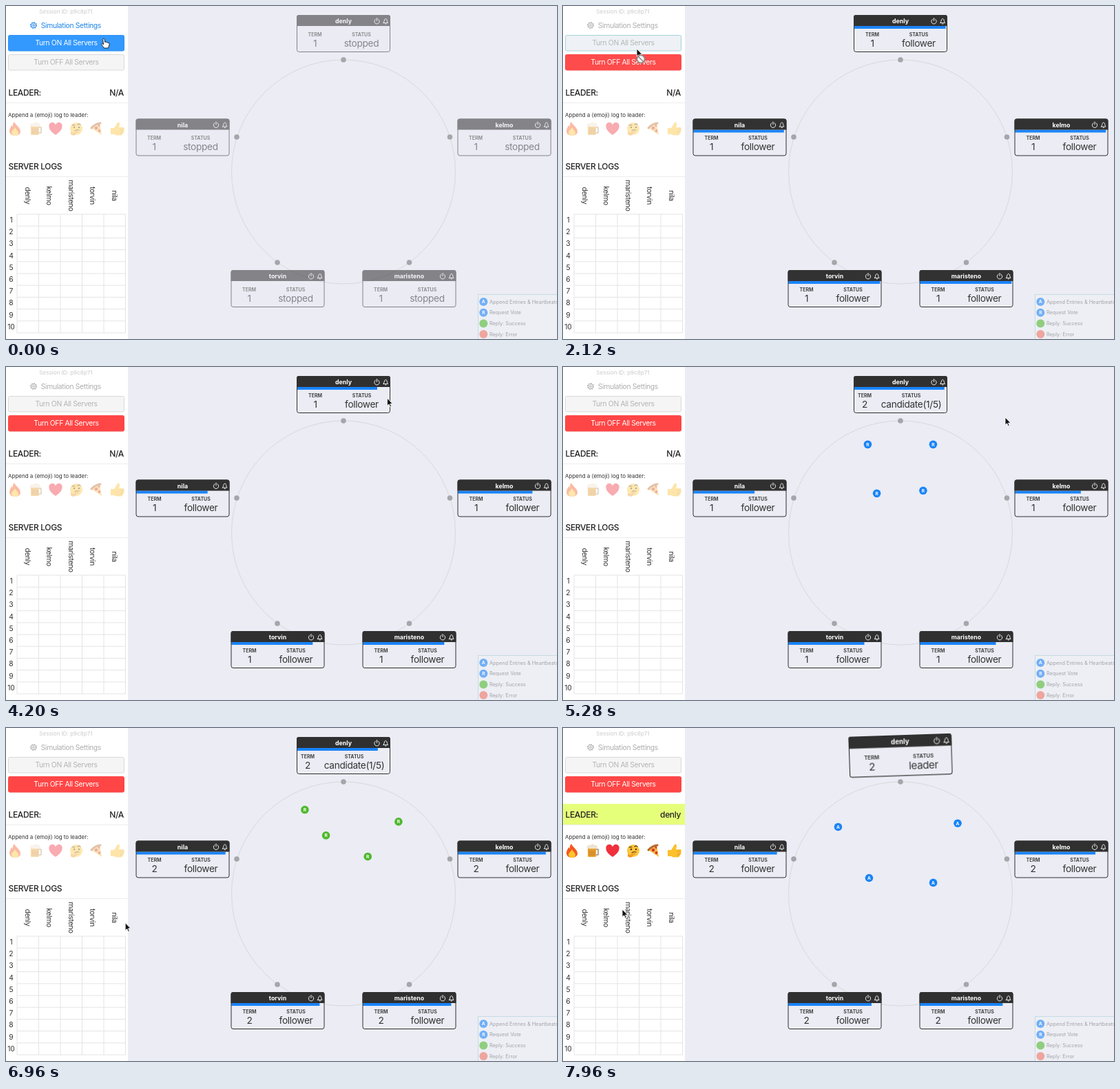
Write an HTML page that moves like this. It is 800 px wide and 483 px high and loops after 8 s.

```html
<!DOCTYPE html>
<html lang="en">
<head>
<meta charset="utf-8">
<title>Leader election</title>
<style>
  html, body { margin: 0; width: 100%; height: 100%; overflow: hidden; background: #ebecf4; }
  svg { display: block; width: 800px; height: 483px; font-family: Inter, Roboto, sans-serif; font-size: 10.3px; fill: #333; }
  text { white-space: pre; }
  .mid { text-anchor: middle; }
  .end { text-anchor: end; }
  .ui { letter-spacing: -.03em; }
  .title { font-size: 12px; font-weight: 500; letter-spacing: -.03em; fill: #222; }
  .small { font-size: 8px; }
  .label { font-size: 7px; font-weight: 700; fill: #444; }
  .value { font-size: 13.7px; letter-spacing: -.025em; }
  .name { font-size: 8.8px; font-weight: 700; fill: #fff; }
  .letter { font-size: 6.6px; font-weight: 700; fill: #fff; text-anchor: middle; }
  .legend { font-size: 7.3px; fill: #6f7076; }
  .line { fill: none; stroke-linecap: round; stroke-linejoin: round; }
  .body { transform-origin: 68px 27px; }
</style>
</head>
<body>
<svg id="stage" viewBox="0 0 800 483">
  <rect width="800" height="483" fill="#ebecf4"/>
  <circle cx="490" cy="240.5" r="162.5" fill="none" stroke="#d9d9dc"/>
  <g id="messages"></g>
  <g id="dots" fill="#a6a6aa"></g>
  <g id="cards"></g>

  <g id="legend" opacity=".58">
    <rect x="685.5" y="418.5" width="130" height="80" fill="#eef1f6" stroke="#a9cfd4"/>
  </g>

  <rect width="177" height="483" fill="#fff"/>
  <text class="small mid" x="87" y="11" font-weight="500" fill="#d2d2d2">Session ID: p9c8p71</text>
  <g id="settings" stroke="#1c84e6" fill="#1c84e6">
    <g fill="none">
      <circle cx="40" cy="28" r="3.5"/>
      <circle cx="40" cy="28" r="1.4" stroke-width=".9"/>
      <circle cx="40" cy="28" r="4.4" stroke-width="1.2" stroke-dasharray="1.7 1.75"/>
    </g>
    <text class="ui" x="50.7" y="31.7" stroke="none">Simulation Settings</text>
  </g>
  <g id="buttons"></g>

  <rect id="leaderBar" y="110" width="177" height="30" fill="#e6ff7b"/>
  <path d="M0 140.5H177M0 247.5H177" stroke="#ededed"/>
  <text class="title" x="3.5" y="130">LEADER:</text>
  <text class="title end" id="leader" x="171" y="130"></text>
  <text class="small" x="3" y="160.5">Append a (emoji) log to leader:</text>

  <g id="emoji">
    <g transform="translate(13 178)">
      <path fill="#f4581f" d="M-1-10C1-5 8-2 8 4C8 8 4 10 0 10S-8 8-8 3C-8 0-6-2-5-5C-4-4-3-3-3-1C-4-4-3-8-1-10Z"/>
      <path fill="#fdc52c" d="M0-2C1 1 5 3 5 6S3 10 0 10-5 8-5 5.500C-5 3-1 1 0-2Z"/>
    </g>
    <g transform="translate(43 178)">
      <path class="line" stroke="#b9a58b" stroke-width="2" d="M4-2H8V6H4"/>
      <rect x="-7" y="-5" width="12" height="14" rx="1.500" fill="#e9a12f"/>
      <path class="line" stroke="#b9712a" d="M-4 0V7M-1 0V7M2 0V7"/>
      <path fill="#eee3d0" d="M-8-3C-10-7-5-9-3-8C-1-11 3-9 4-8C8-8 8-3 5-3Z"/>
    </g>
    <path transform="translate(72 178)" fill="#f0303c" d="M0 9C-6 5-9.500 1-9.500-3A4.900 4.900 0 0 1 0-5.500A4.900 4.900 0 0 1 9.500-3C9.500 1 6 5 0 9Z"/>
    <g transform="translate(102 178)">
      <circle r="9" fill="#fcc63a"/>
      <path class="line" stroke="#6a4216" stroke-width="1.300" d="M-6-5Q-4-6-2-5M2-6Q4-8 6-6M-2 3Q1 1 4 2"/>
      <circle cx="-3" cy="-2" r="1.300" fill="#5b3510"/>
      <circle cx="4" cy="-2" r="1.300" fill="#5b3510"/>
      <path fill="#ef9a25" d="M-8 4L-5 6L3 3V5L-1 7C0 10-6 11-8 8Z"/>
    </g>
    <g transform="translate(132 178)">
      <path fill="#f6bd4a" d="M-8-1L4-8L7 9Z"/>
      <path class="line" stroke="#b8692b" stroke-width="3" d="M-8-1Q-3-7 5-8"/>
      <g fill="#d2352b"><circle cx="-1" cy="-1" r="2.300"/><circle cx="3.500" cy="3" r="1.900"/><circle cx="3" cy="-4.500" r="1.400"/></g>
    </g>
    <g transform="translate(162 178)">
      <path fill="#fcc02d" d="M-10-1H-5L0-9C3-11 4-7 2-2H8C10-2 10 0 9 1C10 2 10 4 8.500 4.500C9 6 8 7 7 7C7 9 6 9.500 4 9.500H-2L-5 8H-10Z"/>
      <path class="line" stroke="#dd8f1c" stroke-width=".8" d="M4 1H9M4 4.500H8.500M4 7H7"/>
    </g>
  </g>

  <text class="title" x="3.500" y="237">SERVER LOGS</text>
  <g id="table"></g>

  <g id="cursor">
    <path id="hand" fill="#fff" stroke="#222" stroke-linejoin="round" d="M-1.300.500C-1.300-1 1-1 1.200.500L1.700 4.500C3 3.800 3.700 4.200 4 5C5 4.400 5.800 4.900 6 5.600C7.500 5 8 6 8 7.200C8 9.500 7 10.500 6.500 13H0C-.500 11-2.500 9.500-3.500 7.500C-3.500 6-2 6.200-.500 8Z"/>
    <path id="arrow" fill="#111" stroke="#fff" stroke-width=".9" d="M0 0V11.200L2.600 8.800L4.400 12.800L6.200 12L4.500 8.200H8Z"/>
    <g id="denied" fill="#f4f4f4" stroke="#8b8b8b" stroke-width="1.500">
      <circle cx="6" cy="15" r="5.500"/><path d="M2.200 11.200L9.800 18.800"/>
    </g>
  </g>
</svg>
<script>
const LOOP = 8000, POWER_ON = 1830, CLOCK = 1880, CANDIDATE = 4833, SECOND_VOTE = 7277, ELECTED = 7340;
const BLUE = '#1a84f8', GREEN = '#4eb82b';
const $ = id => document.getElementById(id);
const add = (id, html) => {
  $(id).insertAdjacentHTML('beforeend', html);
  return $(id).lastElementChild;
};
const ramp = (t, start, length) => Math.min(1, Math.max(0, (t - start) / length));
const text = (x, y, cls, str, more = '') => `<text x="${x}" y="${y}" class="${cls}" ${more}>${str}</text>`;
const range = n => [...Array(n).keys()];

// reset: when the election timer restarts; rates: timer speed in px/s before and after
const servers = [
  { name: 'denly', x: 422, y: 13, dot: [490, 78], reset: CANDIDATE, rates: [8, 8.3] },
  { name: 'kelmo', x: 655.5, y: 163.5, dot: [644.5, 190], reset: 6293, rates: [11.5, 10.8] },
  { name: 'maristeno', x: 517.5, y: 383, dot: [585.5, 372], reset: 6133, rates: [7.2, 8] },
  { name: 'torvin', x: 326.5, y: 383, dot: [394, 372], reset: 6083, rates: [7.2, 7.5] },
  { name: 'nila', x: 188.5, y: 163.5, dot: [335, 190], reset: 6293, rates: [13.5, 8] }
];

// centres of the term and status columns
const columns = { stopped: [26.5, 94], follower: [27, 94.5], candidate: [16, 83.5], leader: [30, 98] };

for (const s of servers) {
  add('dots', `<circle cx="${s.dot[0]}" cy="${s.dot[1]}" r="3.8"/>`);
  s.el = add('cards', `<g transform="translate(${s.x} ${s.y})"><g class="body">
    <rect x=".5" y=".5" width="135" height="53" rx="3" fill="#ebecf4"/>
    <rect class="bar" x=".5" y="16" height="4" fill="${BLUE}"/>
    <path d="M0 16V3Q0 0 3 0H133Q136 0 136 3V16Z" fill="#303030"/>
    <rect x=".5" y=".5" width="135" height="53" rx="3" fill="none" stroke="#303030"/>
    ${text(68, 12, 'name mid', s.name)}
    <g class="line" stroke="#fff" stroke-width=".9">
      <path d="M114.700 6A3.700 3.700 0 1 0 118.300 6M116.500 4.500V8.500"/>
      <path d="M126 11.500H132.500C131 10 131.600 5.500 129.300 5.500S127.500 10 126 11.500ZM128.700 13H129.900"/>
    </g>
    ${text(0, 30.6, 'label mid term', 'TERM')}${text(0, 45.7, 'value mid term', '')}
    ${text(0, 30.6, 'label mid status', 'STATUS')}${text(0, 45.7, 'value mid status', '')}
  </g></g>`).firstElementChild;
  s.bar = s.el.querySelector('.bar');
  s.term = s.el.querySelectorAll('.term');
  s.status = s.el.querySelectorAll('.status');
}

const tada = servers[0].el.animate([0, .1, .2, .3, .4, .5, .6, .7, .8, .9, 1].map((offset, i) => ({
  offset, easing: 'ease',
  transform: i % 10 === 0 ? 'scale(1) rotate(0deg)'
    : i < 3 ? 'scale(.9) rotate(-3deg)' : `scale(1.1) rotate(${i % 2 ? 3 : -3}deg)`
})), { duration: 1000, fill: 'both' });
tada.pause();

const messages = [
  [0, 1, CANDIDATE, 1460, 'R', BLUE], [0, 2, CANDIDATE, 1300, 'R', BLUE],
  [0, 3, CANDIDATE, 1250, 'R', BLUE], [0, 4, CANDIDATE, 1460, 'R', BLUE],
  [1, 0, 6293, 1383, 'R', GREEN], [2, 0, 6133, 1312, 'R', GREEN],
  [3, 0, 6083, 1194, 'R', GREEN], [4, 0, 6293, 1047, 'R', GREEN],
  [0, 1, 7337, 1161, 'A', BLUE], [0, 2, 7337, 1253, 'A', BLUE],
  [0, 3, 7337, 1315, 'A', BLUE], [0, 4, 7337, 1068, 'A', BLUE]
].map(([from, to, start, length, letter, color]) => ({
  a: servers[from].dot, b: servers[to].dot, start, length,
  el: add('messages', `<g><circle r="5.8" fill="${color}"/>${text(0, 2.4, 'letter', letter)}</g>`)
}));

[['#1a84f8', 'A', 'Append Entries &amp; Heartbeats'], ['#1a84f8', 'R', 'Request Vote'],
 ['#4eb82b', '', 'Reply: Success'], ['#ef7261', '', 'Reply: Error']].forEach(([color, letter, label], i) => {
  const y = 429 + i * 15.7;
  add('legend', `<g><circle cx="693.3" cy="${y}" r="6" fill="${color}"/>
    ${text(693.3, y + 2.4, 'letter', letter)}${text(702, y + 2.7, 'legend', label)}</g>`);
});

const button = (y, label, fill, ink, border) => add('buttons', `<g>
  <rect x="3.500" y="${y}.500" width="168" height="22.500" rx="2" fill="${fill}" stroke="${border}"/>
  ${text(87.5, y + 15.4, 'ui mid', label, `fill="${ink}"`)}</g>`);
const ON = 'Turn ON All Servers', OFF = 'Turn OFF All Servers';
const onIdle = button(42, ON, '#f5f5f5', '#b4b4b4', '#d9d9d9');
const onLive = button(42, ON, '#3399ff', '#fff', '#2f90f0');
const offIdle = button(70, OFF, '#f5f5f5', '#b4b4b4', '#d9d9d9');
const offLive = button(70, OFF, '#ff4646', '#fff', '#ff4646');

add('table', `<path fill="none" stroke="#e4e4e4" d="${range(11).map(i => `M16 ${302 + i * 17.2}H173.500`).join('')}${
  range(6).map(i => `M${16 + i * 31.5} 302V474`).join('')}"/>`);
range(10).forEach(i => add('table', text(7.5, 314 + i * 17.2, 'mid', i + 1)));
servers.forEach((s, i) => add('table',
  text(0, 0, 'ui mid', s.name, `transform="translate(${28 + i * 31.4} 275) rotate(90)"`)));

// time, x, y
const path = [
  [0, 142, 48], [500, 114, 57], [840, 122, 53], [1040, 112, 70], [1200, 107, 62], [2600, 107, 62],
  [3000, 156, 59], [3440, 320, 62], [4240, 555, 45], [4650, 549, 22], [4850, 549, 22], [5280, 642, 73],
  [5800, 470, 230], [6280, 259, 281], [6760, 188, 285], [7520, 102, 271], [7960, 86, 263], [8000, 86, 263]
];
function cursorAt(t) {
  const i = path.findIndex((p, k) => k && t <= p[0]);
  const [t0, x0, y0] = path[i - 1], [t1, x1, y1] = path[i];
  const u = (t - t0) / (t1 - t0), e = u * u * (3 - 2 * u);
  return [x0 + (x1 - x0) * e, y0 + (y1 - y0) * e];
}

const show = (el, on) => el.setAttribute('display', on ? 'inline' : 'none');
const setText = (el, str) => { if (el.textContent !== str) el.textContent = str; };

function stateOf(s, t) {
  if (t < POWER_ON) return 'stopped';
  if (s !== servers[0] || t < CANDIDATE) return 'follower';
  return t < SECOND_VOTE ? 'candidate(1/5)' : t < ELECTED ? 'candidate(2/5)' : 'leader';
}

function drawServer(s, t, power) {
  const state = stateOf(s, t), [termX, statusX] = columns[state.split('(')[0]];
  const renewed = t >= s.reset;
  const lost = Math.max(0, t - (renewed ? s.reset : CLOCK)) / 1000 * s.rates[+renewed];
  s.el.setAttribute('opacity', .55 + .45 * power);
  s.bar.setAttribute('width', 135 - lost);
  show(s.bar, state !== 'stopped' && state !== 'leader');
  s.term.forEach(el => el.setAttribute('x', termX));
  s.status.forEach(el => el.setAttribute('x', statusX));
  setText(s.term[1], renewed ? '2' : '1');
  setText(s.status[1], state);
}

function draw(t) {
  const power = ramp(t, POWER_ON, 300), elected = t >= ELECTED;
  servers.forEach(s => drawServer(s, t, power));
  tada.currentTime = Math.max(0, t - ELECTED - 6);

  for (const m of messages) {
    const u = (t - m.start) / m.length;
    show(m.el, u >= 0 && u < 1);
    m.el.setAttribute('transform', `translate(${m.a.map((v, i) => v + (m.b[i] - v) * u).join(' ')})`);
  }

  onLive.setAttribute('opacity', 1 - power);
  offLive.setAttribute('opacity', power);
  const tint = power < .5 ? '#1c84e6' : '#adadad';
  $('settings').setAttribute('fill', tint);
  $('settings').setAttribute('stroke', tint);

  const glow = 1 - (1 - ramp(t, ELECTED, 350)) ** 3;
  $('leaderBar').setAttribute('opacity', glow);
  $('emoji').setAttribute('opacity', .4 + .6 * glow);
  setText($('leader'), elected ? servers[0].name : 'N/A');

  const [x, y] = cursorAt(t), hovering = x < 172 && y > 42 && y < 65, clickable = t < POWER_ON;
  $('cursor').setAttribute('transform', `translate(${x} ${y})`);
  show($('hand'), clickable);
  show($('arrow'), !clickable);
  show($('denied'), !clickable && hovering);
  onIdle.firstElementChild.setAttribute('stroke', hovering ? '#a9d6da' : '#d9d9d9');
}

const began = performance.now();
function tick() {
  draw((performance.now() - began) % LOOP);
  requestAnimationFrame(tick);
}
tick();
</script>
</body>
</html>
```
